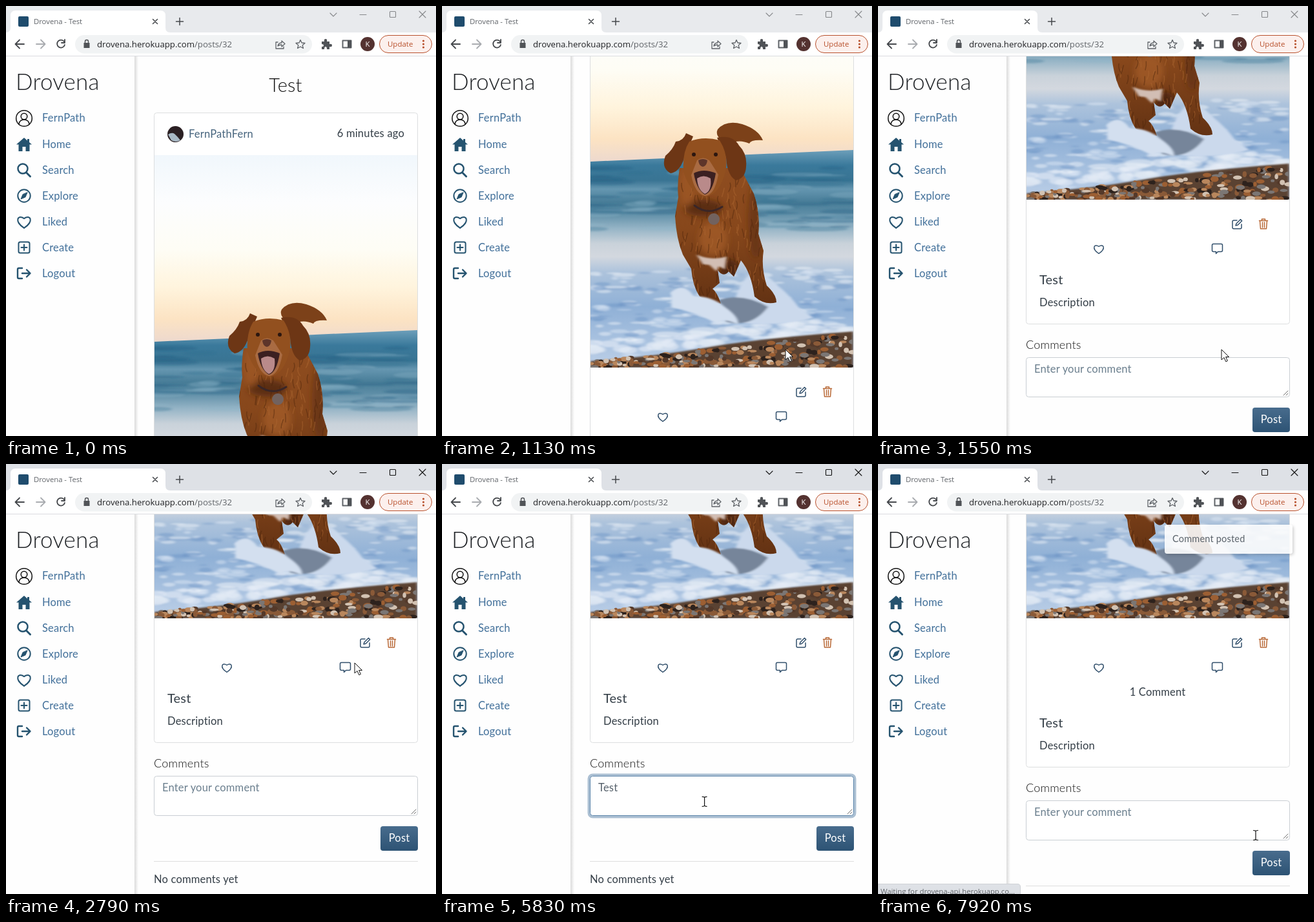
These frames come from a looping animation (666 px wide and 666 px high, 8 s). An HTML page:

```html
<!DOCTYPE html>
<html lang="en">
<head>
<meta charset="utf-8">
<title>Comment demo</title>
<style>
  html, body { margin: 0; width: 100%; height: 100%; overflow: hidden; background: #fff; }
  svg { display: block; width: 666px; height: 666px; }
  text { font: 16.5px Lato, sans-serif; letter-spacing: .2px; fill: #343e47; white-space: pre; }
  .ui text { font: 11.3px "Open Sans", sans-serif; letter-spacing: 0; fill: #5f6368; }
  .line { fill: none; stroke-width: 1.5; stroke-linecap: round; stroke-linejoin: round; }
  .light { font-weight: 300; fill: #111; }
  #side text { fill: #42709a; }
  #side .light { fill: #1d2024; }
  .mid { text-anchor: middle; }
  .end { text-anchor: end; }
</style>
</head>
<body>
<svg viewBox="0 0 666 666">
  <defs>
    <clipPath id="view"><path d="M0 78h666v588H0z"/></clipPath>
    <clipPath id="photoClip"><path d="M230 231h407v608H230z"/></clipPath>
    <clipPath id="bodyClip"><use href="#body"/></clipPath>
    <linearGradient id="sky" x2="0" y2="1">
      <stop stop-color="#f1f7fc"/><stop offset=".25" stop-color="#fcfdfe"/>
      <stop offset=".5" stop-color="#fefdf5"/><stop offset=".7" stop-color="#fff4dd"/>
      <stop offset=".87" stop-color="#fce3c3"/><stop offset="1" stop-color="#ecd8cf"/>
    </linearGradient>
    <linearGradient id="sea" x2="0" y2="1">
      <stop stop-color="#6d9fba"/><stop offset=".07" stop-color="#3a799b"/>
      <stop offset=".14" stop-color="#397493"/><stop offset=".18" stop-color="#6596b0"/>
      <stop offset=".24" stop-color="#477c97"/><stop offset=".29" stop-color="#5d8da6"/>
      <stop offset=".36" stop-color="#95b4c6"/><stop offset=".43" stop-color="#c9d2da"/>
      <stop offset=".49" stop-color="#d3d8df"/><stop offset=".56" stop-color="#adc3dc"/>
      <stop offset=".72" stop-color="#8fb0d6"/><stop offset="1" stop-color="#bdd0e8"/>
    </linearGradient>
    <linearGradient id="fur" x2="0" y2="1">
      <stop stop-color="#8f4d20"/><stop offset=".45" stop-color="#87471b"/><stop offset="1" stop-color="#633213"/>
    </linearGradient>
    <linearGradient id="blue" x2="0" y2="1"><stop stop-color="#486c8d"/><stop offset="1" stop-color="#2d5374"/></linearGradient>
    <linearGradient id="shade"><stop stop-color="#000" stop-opacity=".14"/><stop offset="1" stop-color="#000" stop-opacity="0"/></linearGradient>
    <filter id="drop" x="-10%" y="-30%" width="120%" height="170%"><feDropShadow dy="2" stdDeviation="2" flood-opacity=".2"/></filter>
    <filter id="soft"><feGaussianBlur stdDeviation="2.2 1.1"/></filter>
    <filter id="blur"><feGaussianBlur stdDeviation="5"/></filter>
    <path id="heart" class="line" d="M0 7C-12-1-7-9 0-4C7-9 12-1 0 7Z"/>
  </defs>
  <path d="M0 0h666v666H0z" fill="#fefefe"/>

  <g clip-path="url(#view)">
    <g id="page">
      <text x="433" y="133" class="mid light" style="font-size:29px">Test</text>
      <rect id="card" x="229.5" y="165.5" width="408" rx="4" fill="#fff" stroke="#dcdedf"/>
      <circle cx="262.5" cy="198.5" r="12.5" fill="#2b2023"/>
      <path d="M251 199q6-4 10-1l5 5 4 5q-7 4-14 0z" fill="#a9b9c5"/>
      <text x="283" y="204" style="fill:#46647d">FernPathFern</text>
      <text x="617" y="203" class="end">6 minutes ago</text>

      <g clip-path="url(#photoClip)">
        <path d="M230 231h407v292H230z" fill="url(#sky)"/>
        <path d="M230 520L637 502V839H230z" fill="url(#sea)"/>
        <g id="water" filter="url(#soft)"></g>
        <path d="M230 829Q330 822 410 808T637 783V839H230z" fill="#5a4232" filter="url(#soft)"/>
        <g id="pebbles"></g>

        <g filter="url(#soft)">
          <path d="M455 730Q462 705 480 692Q500 690 520 712Q540 728 552 745L575 762Q510 780 430 765Z" fill="#cbd9ec"/>
          <path d="M428 735Q465 722 505 745Q480 778 440 768Z" fill="#76859a"/>
        </g>
        <path d="M437 490Q422 480 427 470Q440 455 465 462Q490 470 497 487Q478 486 476 492Q458 484 445 494Z" fill="#7c4119"/>
        <path id="body" d="M368 530Q364 555 366 575L361 605Q363 640 373 664L386 686Q388 712 399 729Q414 739 432 740Q426 722 419 717L430 708L427 688Q436 700 444 690L452 698L463 673Q479 692 484 729Q500 743 518 738Q518 726 503 712Q494 685 498 658L490 632Q493 600 483 570L462 530Z" fill="url(#fur)"/>
        <g clip-path="url(#bodyClip)">
          <g filter="url(#blur)">
            <ellipse cx="405" cy="592" rx="30" ry="13" fill="#4f270f" opacity=".8"/>
            <ellipse cx="420" cy="640" rx="22" ry="26" fill="#a55e29" opacity=".7"/>
            <ellipse cx="486" cy="610" rx="12" ry="60" fill="#5a2c10" opacity=".6"/>
            <ellipse cx="446" cy="690" rx="14" ry="18" fill="#43200d" opacity=".8"/>
            <ellipse cx="380" cy="560" rx="12" ry="30" fill="#a35a26" opacity=".6"/>
          </g>
          <g id="coat" class="line" opacity=".45"></g>
        </g>
        <path d="M394 664Q418 674 441 667L438 687L429 682L425 690L414 680L404 679Z" fill="#d2beb4" filter="url(#soft)"/>
        <path d="M389 481L378 476Q374 488 362 489Q358 501 346 511Q339 530 354 538Q369 536 376 512ZM426 483Q450 478 460 495Q473 508 471 528Q470 546 455 549Q442 542 440 514Z" fill="#6d3615"/>
        <path d="M383 489Q405 480 430 487Q443 508 440 530Q432 571 408 574Q384 570 374 535Q372 506 383 489Z" fill="#92501f"/>
        <path d="M395 518Q404 511 414 518L428 540Q422 573 407 573Q392 570 386 541Z" fill="#a96b42"/>
        <path d="M390 538Q405 530 424 538Q419 568 407 571Q394 563 390 538Z" fill="#3b2021"/>
        <path d="M395 546Q405 539 416 546Q418 566 407 570Q396 564 395 546Z" fill="#b98a8a"/>
        <path d="M397 518q7-4 14 0q-1 9-7 10q-6-1-7-10z" fill="#5d352a"/>
        <circle cx="390" cy="509" r="3" fill="#2c1710"/><circle cx="424" cy="509" r="3" fill="#2c1710"/>
        <path class="line" d="M391 588Q412 604 434 590" stroke="#3a2627" style="stroke-width:3"/>
        <circle cx="421" cy="609" r="9" fill="#72625f"/>
        <path d="M355 722Q374 706 390 728Q420 729 438 745Q462 762 458 772Q432 760 428 772Q390 752 355 746Z" fill="#d3dfef" filter="url(#soft)"/>
      </g>

      <g class="line" stroke="#32506c">
        <path d="M556 871h-5q-2 0-2 2v9q0 2 2 2h10q2 0 2-2v-5M554 879l1-3 6.500-6.500 2.200 2.200-6.500 6.500z"/>
        <path d="M519.500 907.500h12q2 0 2 2v8q0 2-2 2h-5l-3 3v-3h-4q-2 0-2-2v-8q0-2 2-2z"/>
        <use href="#heart" x="342" y="915.500"/>
        <path d="M590.500 871.500h13M594.500 871v-2h5v2M591.500 872l1 12h9l1-12M595.500 874v8M598.500 874v8" stroke="#b96a38"/>
      </g>
      <text id="count" x="433" y="959" class="mid">1 Comment</text>

      <g id="lower">
        <text x="250" y="970" style="font-size:20px">Test</text>
        <text x="250" y="1004">Description</text>
        <text x="229" y="1070" class="light" style="font-size:18px">Comments</text>
        <rect id="ring" x="227.5" y="1081.5" width="412" height="65" rx="6" fill="none" stroke="#acc0d3" stroke-width="4"/>
        <rect id="field" x="229.5" y="1083.5" width="408" height="61" rx="4" fill="#fff"/>
        <path class="line" d="M628 1142l7-7M632 1142l3-3" stroke="#707070" style="stroke-width:1"/>
        <text id="entry" x="242" y="1107"></text>
        <path id="caret" d="M0 1092v19" stroke="#222"/>
        <rect id="button" y="1161" height="38" rx="4"/>
        <text id="label" y="1185" class="mid" style="fill:#fff"></text>
        <path d="M229 1215.500h409" stroke="#dedede"/>
        <text id="none" x="229" y="1249">No comments yet</text>
      </g>
    </g>
  </g>

  <g id="side">
    <path d="M0 78h199v588H0z" fill="#fefefe"/>
    <path d="M199 78h6v588h-6z" fill="url(#shade)"/>
    <text x="15" y="130" class="light" style="font-size:35px">Drovena</text>
    <g class="line" stroke="#111">
      <circle cx="28" cy="174" r="12.300"/><circle cx="28" cy="171" r="4.800"/><path d="M20 183q1-7 8-7t8 7"/>
    </g>
    <path d="M28 204L16 214.500h3.500V225h6v-7h5v7h6v-10.500H40l-4-3.500v-5h-3v2.500z" fill="#25536f"/>
    <g class="line" stroke="#25536f" style="stroke-width:2">
      <circle cx="26" cy="252" r="7.500" stroke-width="2.500"/><path d="M31.500 258l6 6" stroke-width="3"/>
      <circle cx="28" cy="294" r="9.700"/><path d="M33 289l-3 7-7 3 3-7z" fill="#25536f" stroke-width="1"/>
      <use href="#heart" transform="translate(28 334.500) scale(1.350)"/>
      <rect x="19.500" y="365.500" width="17" height="17" rx="2.500"/><path d="M28 369.500v9M23.500 374h9"/>
      <path d="M25 406h-5q-2 0-2 2v12q0 2 2 2h5M25 414h12M32 408.500l5.500 5.500-5.500 5.500" stroke-width="2.400"/>
    </g>
    <text x="56" y="179">FernPath</text>
    <text x="56" y="220">Home</text>
    <text x="56" y="260">Search</text>
    <text x="56" y="300">Explore</text>
    <text x="56" y="340">Liked</text>
    <text x="56" y="380">Create</text>
    <text x="56" y="420">Logout</text>
  </g>

  <g class="ui">
    <path id="bar" d="M0 0h666v42H0z"/>
    <path d="M0 41h666v36H0zM0 41q7 0 7-8V15q0-8 8-8h224q8 0 8 8v18q0 8 7 8z" fill="#fff"/>
    <path d="M0 77.500h666" stroke="#dadce0"/>
    <rect x="19" y="16" width="16" height="16" rx="2" fill="#1f4c6d"/>
    <text x="43" y="28">Drovena - Test</text>
    <g class="line" stroke="#45484c">
      <path d="M227.500 20.500l7 7m0-7l-7 7M263.500 24h11M269 18.500v11"/>
      <path d="M28 59H15m6-6.500L14.500 59l6.500 6.500" stroke-width="1.800"/>
      <path d="M47 59h13m-6-6.500l6.500 6.500-6.500 6.500" stroke="#a9acb0" stroke-width="1.800"/>
      <path d="M90 55a6 6 0 1 0 1 5M91 52v5h-5" stroke-width="1.800"/>
    </g>
    <g id="controls" class="line" style="stroke-width:1.100">
      <path d="M502 11l5 5 5-5M548 13.500h10M640 8l10 10m0-10l-10 10"/><rect x="594.500" y="8.500" width="9" height="9" rx="1"/>
    </g>
    <rect x="107" y="45" width="367" height="28.500" rx="14.200" fill="#f1f3f4"/>
    <path d="M120.500 57h9v8h-9z" fill="#505357"/>
    <path class="line" d="M122.500 57v-2q0-2.500 2.500-2.500t2.500 2.500v2" stroke="#505357"/>
    <text x="141" y="64" style="font-size:13.200px"><tspan fill="#202124">drovena.herokuapp.com</tspan>/posts/32</text>
    <g class="line" stroke="#5f6368" style="stroke-width:1.300">
      <path d="M421 56h-3v10h12v-3M421 62q1-5 6-5v-3l5 4.500-5 4.500v-3q-4 0-6 2z"/>
      <path d="M456 52.500l2 4.500 5 .5-3.800 3.300 1.200 4.700-4.400-2.500-4.400 2.500 1.200-4.700-3.800-3.300 5-.5z"/>
      <path d="M521.500 53.500h13v11h-13z" style="stroke-width:2"/>
    </g>
    <path d="M529 53h6v12h-6zM489 55h4q-1-4 2-4t2 4h4v4q4-1 4 2t-4 2v4h-4q0-4-2-4t-2 4h-4v-4q3 0 3-2t-3-2z" fill="#505357"/>
    <circle cx="560" cy="59" r="11" fill="#543230"/>
    <text x="560" y="63" class="mid" style="fill:#fff">K</text>
    <rect x="578.500" y="45.500" width="81" height="27" rx="13.500" fill="#fcf0ed" stroke="#b8502c"/>
    <text x="591" y="63" style="fill:#b8502c;font-size:11.500px">Update</text>
    <path d="M646.500 54v.01M646.500 59v.01M646.500 64v.01" class="line" stroke="#b8502c" style="stroke-width:3.200"/>
  </g>

  <g id="toast">
    <rect x="444" y="94" width="198" height="45" rx="4" fill="#fff" fill-opacity=".88" filter="url(#drop)"/>
    <text x="456" y="121" style="font-size:14.500px;fill:#5b636b">Comment posted</text>
  </g>
  <g id="status" class="ui">
    <path d="M0 650.500h216q4.500 0 4.500 4.500v11H0z" fill="#dee1e6" stroke="#cfd2d6"/>
    <text x="4" y="666">Waiting for drovena-api.herokuapp.co...</text>
  </g>
  <g id="cursor">
    <path id="arrow" d="M0 0v16l4-3.500 2.800 6.300 2.600-1.200-2.800-6.100H11.500z" fill="#fff" stroke="#111"/>
    <path id="beam" class="line" d="M-3.500-7.500Q0-7.500 0-6Q0-7.500 3.500-7.500M0-6V6M-3.500 7.500Q0 7.500 0 6Q0 7.500 3.500 7.500" stroke="#111" style="stroke-width:1.200"/>
  </g>
</svg>

<script>
const LOOP = 8000, FOCUS = 2860, CLICK = 6520, SENDING = 6660, POSTED = 7190;
const KEY_TIMES = [4560, 4820, 5020, 5220];
const SCROLL = [[700, 0], [920, 140], [1270, 370], [1480, 500], [1550, 539], [1680, 600]];
const POINTER = [
  [320, 586, 603], [520, 532, 532], [1920, 532, 532], [2150, 567, 450], [2380, 470, 345],
  [2520, 410, 312], [2720, 540, 308], [3400, 540, 308], [4100, 325, 499],
  [5580, 325, 499], [6380, 585, 575]
];

const $ = id => document.getElementById(id);
const set = (id, attrs) => { for (const k in attrs) $(id).setAttribute(k, attrs[k]); };
const show = (id, on) => set(id, { visibility: on ? 'visible' : 'hidden' });
const ramp = (t, from, to) => Math.min(1, Math.max(0, (t - from) / (to - from)));

// Linear interpolation over rows of [time, ...values]
function sample(track, t) {
  const next = track.findIndex(row => row[0] > t);
  if (next < 0) return track[track.length - 1].slice(1);
  if (next === 0) return track[0].slice(1);
  const a = track[next - 1], b = track[next], k = ramp(t, a[0], b[0]);
  return a.slice(1).map((v, i) => v + (b[i + 1] - v) * k);
}

let seed = 7;
const rand = (lo, hi) => lo + (hi - lo) * ((seed = seed * 16807 % 2147483647) / 2147483647);
const pick = list => list[Math.floor(rand(0, list.length))];

function add(parent, tag, attrs) {
  const node = document.createElementNS('http://www.w3.org/2000/svg', tag);
  for (const k in attrs) node.setAttribute(k, attrs[k]);
  $(parent).append(node);
}
const blob = (parent, cx, cy, rx, ry, fill, opacity) =>
  add(parent, 'ellipse', { cx, cy, rx, ry, fill, opacity });

function paintPhoto() {
  for (let i = 0; i < 90; i++)
    blob('water', rand(230, 637), rand(530, 625), rand(15, 50), rand(1.5, 4.5), pick(['#245f80', '#326f8e', '#8fb6c9']), .3);
  for (let i = 0; i < 260; i++)
    blob('water', rand(230, 637), rand(685, 820), rand(5, 18), rand(1, 4), pick(['#fff', '#e9f0f9', '#6a91c2']), .4);
  for (let i = 0; i < 45; i++) {
    const x = rand(230, 637);
    blob('water', x, 812 - (x - 230) * .09 + rand(-14, 8), rand(8, 26), rand(3, 8), '#e6edf6', .6);
  }
  for (let i = 0; i < 280; i++) {
    const x = rand(230, 637), top = 830 - (x - 230) * .105;
    blob('pebbles', x, rand(top, 840), rand(2.5, 7.5), rand(2, 4.5),
      pick(['#2d221d', '#54392a', '#8a5a38', '#b9875d', '#d2c2b2', '#7b7674', '#9c5f33']), 1);
  }
  for (let i = 0; i < 170; i++)
    add('coat', 'path', {
      d: `M${rand(362, 500)} ${rand(540, 720)}q${rand(-3, 3)} 6 ${rand(-4, 4)} 13`,
      stroke: pick(['#4e260d', '#b06a34'])
    });
}

function render(t) {
  const [scroll] = sample(SCROLL, t), [x, y] = sample(POINTER, t);
  const posted = t >= POSTED, sending = t >= SENDING && !posted, active = t >= 2790;
  const shift = posted ? 38 : 0;
  const glow = ramp(t, FOCUS, 3100) * (1 - ramp(t, CLICK, CLICK + 150));
  const typed = posted ? 0 : KEY_TIMES.filter(k => t >= k).length;

  set('page', { transform: `translate(0 ${-Math.round(scroll)})` });
  set('lower', { transform: `translate(0 ${shift})` });
  set('card', { height: 866 + shift });
  show('count', posted);
  show('none', !posted);

  set('ring', { opacity: glow });
  set('field', { stroke: glow > .5 ? '#5d86ab' : '#c9ced3' });
  $('entry').textContent = typed ? 'Test'.slice(0, typed) : 'Enter your comment';
  $('entry').style.fill = typed ? '#55606a' : '#6b7f8e';

  const lastKey = typed ? KEY_TIMES[typed - 1] : 3060;
  const caretX = typed ? 242 + $('entry').getComputedTextLength() : 242;
  show('caret', t >= lastKey && t < CLICK && Math.floor((t - lastKey) / 500) % 2 === 0);
  set('caret', { transform: `translate(${Math.round(caretX) + .5} 0)` });

  const width = sending ? 90 : 58;
  const pressed = t >= CLICK && t < SENDING;
  set('button', {
    x: 638 - width, width, fill: sending ? '#768ea5' : 'url(#blue)',
    stroke: pressed ? '#9fb3c7' : 'none', 'stroke-width': 5, 'paint-order': 'stroke'
  });
  set('label', { x: 638 - width / 2 });
  $('label').textContent = sending ? 'Posting...' : 'Post';

  set('bar', { fill: active ? '#dee1e6' : '#e8eaed' });
  set('controls', { stroke: active ? '#111' : '#85878a' });
  show('toast', posted);
  set('status', { opacity: t < 7850 ? 0 : t < 7920 ? .5 : 1 });

  const overField = t > 1950 && y > 483 + shift && y < 545 + shift;
  set('cursor', { transform: `translate(${x} ${y})`, display: t < 320 ? 'none' : 'inline' });
  set('arrow', { display: overField ? 'none' : 'inline' });
  set('beam', { display: overField ? 'inline' : 'none' });
}

paintPhoto();
const start = performance.now();
function tick() {
  render((performance.now() - start) % LOOP);
  requestAnimationFrame(tick);
}
tick();
</script>
</body>
</html>
```
